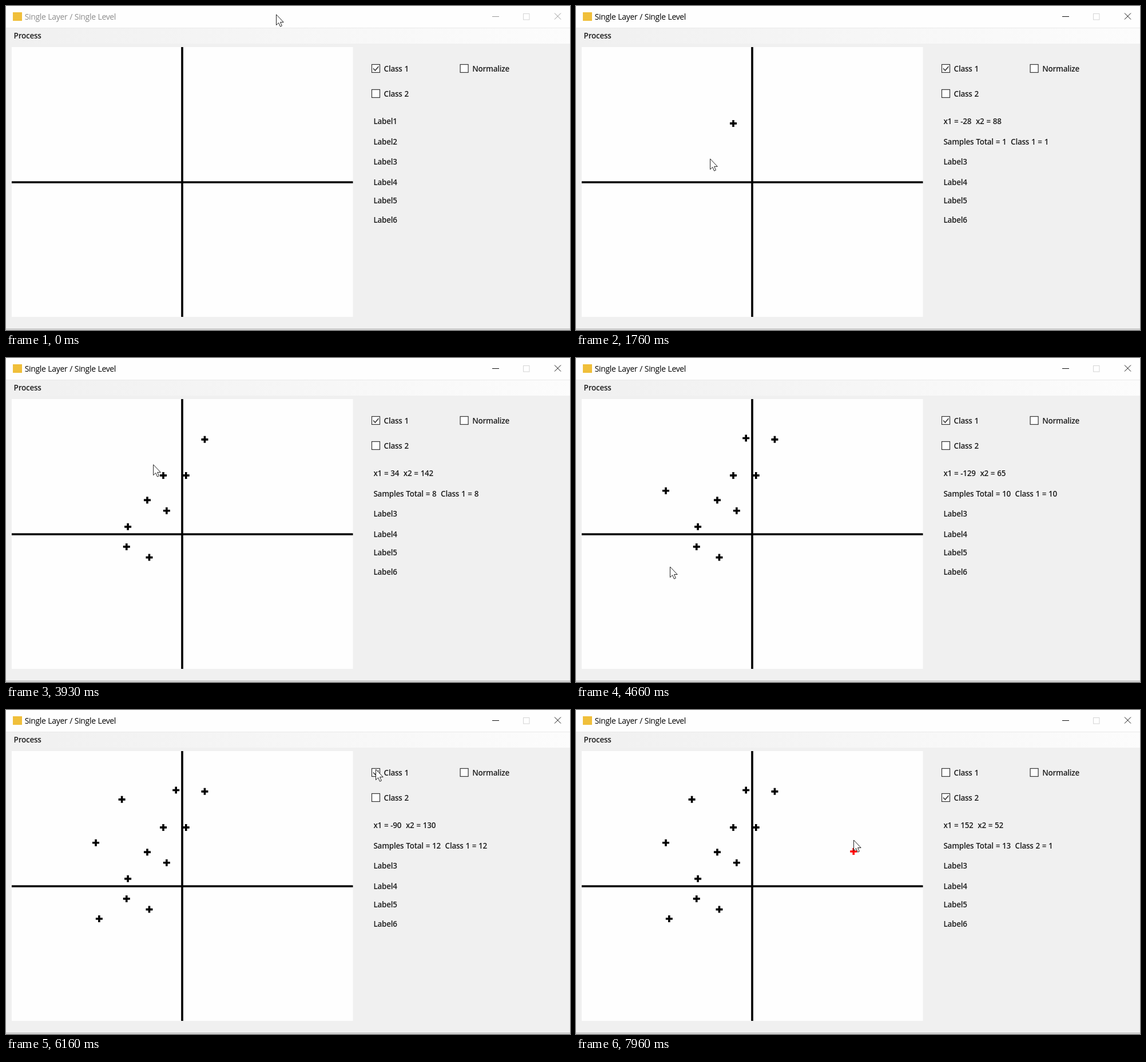
An HTML page for the animation above (8000 ms loop, 986x568 px).

```html
<!DOCTYPE html>
<html lang="en">
<head>
<meta charset="utf-8">
<title>Single Layer / Single Level</title>
<style>
  html, body { margin: 0; width: 100%; height: 100%; overflow: hidden; background: #f0f0f0; }
  svg { display: block; width: 986px; height: 568px; }
  text {
    font: 600 13.5px "Open Sans", "Noto Sans", sans-serif;
    letter-spacing: -.25px;
    word-spacing: .6px;
    fill: #1c1c1c;
    white-space: pre;
  }
  .title { font-weight: 400; font-size: 14px; letter-spacing: -.35px; fill: #000; }
  .glyph { fill: none; stroke: #111; }
  .inactive .title { fill: #8c8c8c; }
  .inactive .glyph { stroke: #999; }
  .box { fill: #fefefe; stroke: #333; stroke-width: 1.2; }
  .tick { fill: none; stroke: #333; stroke-width: 1.5; }
  .plus { fill: none; stroke: #000; stroke-width: 3.6; }
  .red { stroke: #f00; }
  .axis { stroke: #000; stroke-width: 3.7; }
</style>
</head>
<body>
<svg viewBox="0 0 986 568">
  <defs>
    <linearGradient id="strip">
      <stop offset="0" stop-color="#f0f0f0"/>
      <stop offset="1" stop-color="#fcfcfc"/>
    </linearGradient>
  </defs>
  <rect width="986" height="568" fill="#f0f0f0"/>

  <g id="bar">
    <rect width="986" height="38" fill="#fefefe"/>
    <rect y="38" width="986" height="1" fill="#e9e9e9"/>
    <rect x="12" y="11" width="16" height="15" fill="#f0bf3a"/>
    <text class="title" x="32.7" y="24">Single Layer / Single Level</text>
    <path class="glyph" d="M850 18.5h12M959 12.5l11 11m0 -11l-11 11"/>
    <rect x="904.5" y="13.5" width="10.5" height="10.5" fill="none" stroke="#d4d4d4"/>
  </g>

  <rect y="39" width="986" height="27" fill="url(#strip)"/>
  <text x="13.6" y="57">Process</text>
  <rect y="565.6" width="986" height="1.6" fill="#b9b9b9"/>

  <rect x="10" y="72" width="596.5" height="473" fill="#fefefe"/>
  <path class="axis" d="M308 72V545M10 309H606.5"/>
  <g id="plot"></g>

  <g id="panel"></g>
  <path id="cursor" d="M.5 0V18.6L4.7 14.6L7.5 21.2L10.4 19.9L7.6 13.5H13.2Z"
        fill="#fefefe" stroke="#222" stroke-linejoin="round"/>
</svg>

<script>
const LOOP = 8000, DWELL = 40;
const FIRST_CLASS = 12, UNCHECK = 6380, CHECK = 6850;
const $ = id => document.getElementById(id);
const toX = a => 307.7 + a * 1.168;
const toY = b => 308.7 - b * 1.168;

// click time, x1, x2
const samples = [
  [1350, -28, 88], [1920, -52, 51], [2090, -81, 11], [2260, -83, -19],
  [2500, -49, -35], [3020, -23, 35], [3300, 6, 88], [3580, 34, 142],
  [4140, -9, 144], [4400, -129, 65], [4720, -124, -49], [5150, -90, 130],
  [7800, 152, 52]
];

// where the pointer wanders between clicks: time, x, y
const detours = [
  [0, 472, 15], [160, 471, -24], [290, 418, -24], [1130, 275, 196],
  [1760, 234, 268], [2740, 281, 271], [2960, 281, 264], [3700, 346, 134],
  [3930, 257, 187], [4660, 164, 366], [5370, 228, 192], [6100, 646, 104],
  [6450, 646, 104], [6750, 647, 149], [7060, 647, 149], [7650, 484, 248],
  [7960, 485, 228]
];

// the pointer rests on each sample around its click
const stops = samples
  .flatMap(([t, a, b]) => [-DWELL, DWELL].map(d => [t + d, toX(a), toY(b)]))
  .concat(detours)
  .sort((p, q) => p[0] - q[0]);

function add(parent, tag, attrs, text = "") {
  const el = document.createElementNS("http://www.w3.org/2000/svg", tag);
  for (const k in attrs) el.setAttribute(k, attrs[k]);
  el.textContent = text;
  return parent.appendChild(el);
}

function checkbox(x, y, name) {
  add($("panel"), "rect", { class: "box", x: x + .5, y: y + .5, width: 14, height: 14 });
  add($("panel"), "text", { x: x + 21.6, y: y + 13 }, name);
  return add($("panel"), "path", { class: "tick", d: `M${x + 3} ${y + 7.5}l3.4 3.6l6 -7` });
}

const show = (el, on) => el.setAttribute("visibility", on ? "visible" : "hidden");

const tick1 = checkbox(639, 102, "Class 1");
const tick2 = checkbox(639, 146, "Class 2");
show(checkbox(793.6, 102, "Normalize"), false);

const labels = [207, 243, 278, 314, 345.5, 379.5].map((y, i) =>
  add($("panel"), "text", { x: 642.4, y }, "Label" + (i + 1)));

const marks = samples.map(([, a, b], i) => add($("plot"), "path", {
  class: i < FIRST_CLASS ? "plus" : "plus red",
  d: `M${toX(a) - 6} ${toY(b)}h12m-6 -6v12`
}));

function pointer(t) {
  const i = stops.findIndex(s => s[0] > t);
  if (i < 0) return stops[stops.length - 1].slice(1);
  const [t0, x0, y0] = stops[i - 1], [t1, x1, y1] = stops[i];
  const p = (t - t0) / (t1 - t0);
  const e = (p + p * p * (3 - 2 * p)) / 2;
  return [x0 + (x1 - x0) * e, y0 + (y1 - y0) * e];
}

function setText(el, s) {
  if (el.textContent !== s) el.textContent = s;
}

function render(t) {
  const n = samples.filter(s => s[0] <= t).length;
  marks.forEach((m, i) => show(m, i < n));
  $("bar").setAttribute("class", n ? "" : "inactive");
  show(tick1, t < UNCHECK);
  show(tick2, t >= CHECK);

  if (n) {
    const [, a, b] = samples[n - 1];
    const group = n > FIRST_CLASS ? 2 : 1;
    const count = group === 2 ? n - FIRST_CLASS : n;
    setText(labels[0], `x1 = ${a}  x2 = ${b}`);
    setText(labels[1], `Samples Total = ${n}  Class ${group} = ${count}`);
  } else {
    setText(labels[0], "Label1");
    setText(labels[1], "Label2");
  }

  const [x, y] = pointer(t);
  $("cursor").setAttribute("transform", `translate(${x.toFixed(1)} ${y.toFixed(1)})`);
}

const start = performance.now();
function loop() {
  render((performance.now() - start) % LOOP);
  requestAnimationFrame(loop);
}
loop();
</script>
</body>
</html>
```
